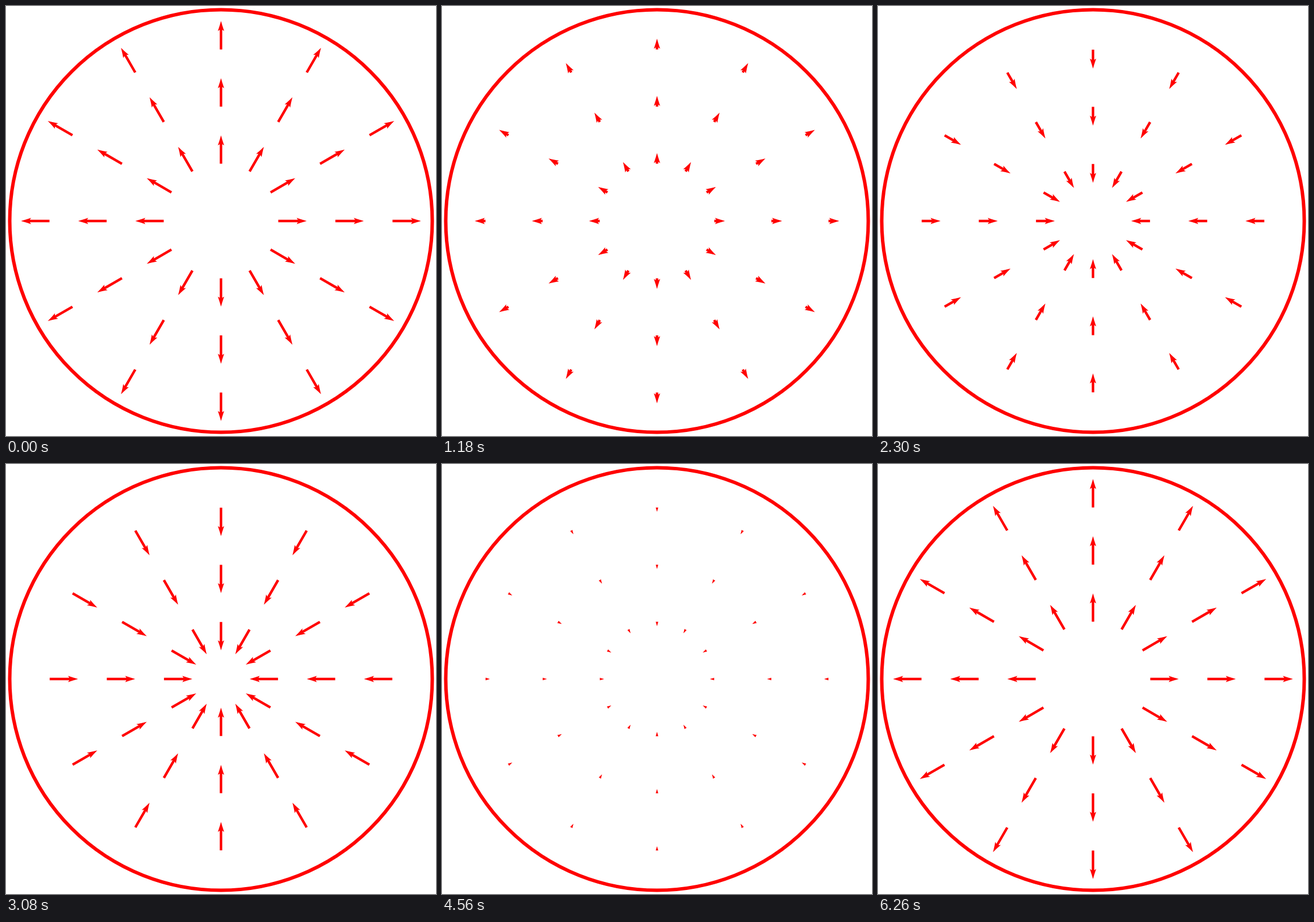
Write an HTML page with a canvas that moves like this. It is 748 px wide and 748 px high and loops after 6.28 s.

```html
<!DOCTYPE html>
<html lang="en">
<head>
<meta charset="utf-8">
<title>Radial oscillation</title>
<style>
  html, body { margin: 0; width: 100%; height: 100%; overflow: hidden; background: #fff; }
  canvas { display: block; width: 748px; height: 748px; }
</style>
</head>
<body>
<canvas id="stage" width="748" height="748"></canvas>
<script>
const ctx = document.getElementById('stage').getContext('2d');
const SIZE = 748, MID = SIZE / 2;
const LOOP = 6280, STEP = 20;
const UNIT = 99.4;           // distance between arrow rings
const REACH = UNIT / 2;      // longest arrow
const HEAD = 17.5, BARB = 5.5, NOTCH = 14;
const SHAFT = 4.4, SHORTEST = 3;

// Arrow along +x from the origin; a head longer than the arrow is cut at its tail.
function drawArrow(length) {
  ctx.beginPath();
  ctx.rect(0, -BARB - 1, length + 1, 2 * BARB + 2);
  ctx.clip();
  if (length > NOTCH) ctx.fillRect(0, -SHAFT / 2, length - NOTCH + 1, SHAFT);
  ctx.beginPath();
  ctx.moveTo(length, 0);
  ctx.quadraticCurveTo(length - HEAD / 2, BARB * 0.43, length - HEAD, BARB);
  ctx.lineTo(length - NOTCH, 0);
  ctx.lineTo(length - HEAD, -BARB);
  ctx.quadraticCurveTo(length - HEAD / 2, -BARB * 0.43, length, 0);
  ctx.fill();
}

function draw(time) {
  const phase = Math.floor((time % LOOP) / STEP) * STEP / 1000;
  const shift = REACH * Math.cos(phase);
  ctx.clearRect(0, 0, SIZE, SIZE);
  ctx.fillStyle = ctx.strokeStyle = '#f00';
  ctx.lineWidth = 6;
  ctx.beginPath();
  ctx.arc(MID, MID, 367.5, 0, 2 * Math.PI);
  ctx.stroke();
  if (Math.abs(shift) < SHORTEST) return;

  for (let ring = 1; ring <= 3; ring++) {
    for (let spoke = 0; spoke < 12; spoke++) {
      ctx.save();
      ctx.translate(MID, MID);
      ctx.rotate(spoke * Math.PI / 6);
      ctx.translate(ring * UNIT, 0);
      if (shift < 0) ctx.scale(-1, 1);
      drawArrow(Math.abs(shift));
      ctx.restore();
    }
  }
}

const start = performance.now();
function tick() {
  draw(performance.now() - start);
  requestAnimationFrame(tick);
}
tick();
</script>
</body>
</html>
```
